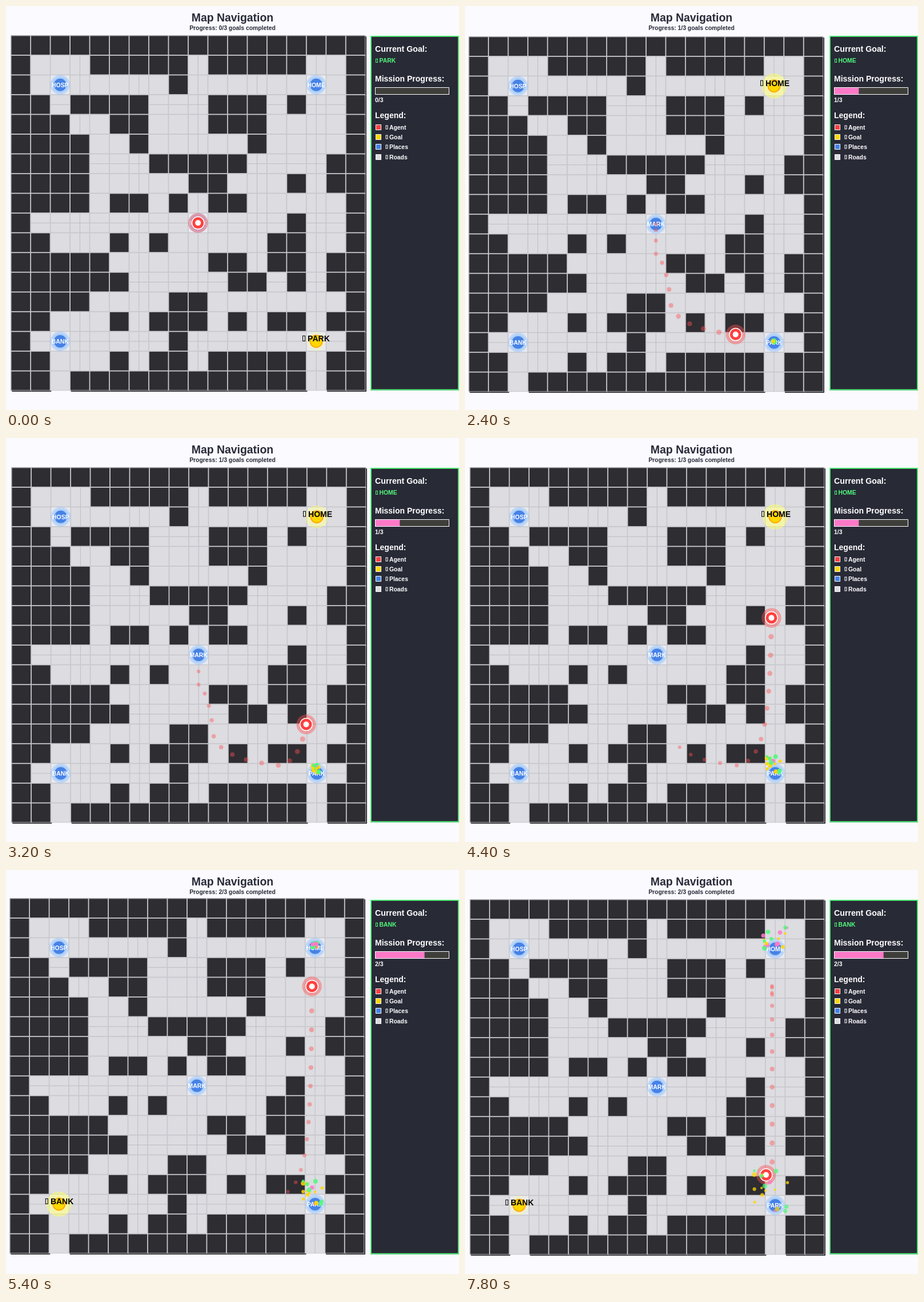
An HTML page with a canvas that plays this animation: 793 by 706 pixels, repeating every 8 s.

```html
<!DOCTYPE html>
<html lang="en">
<head>
<meta charset="utf-8">
<title>Map Navigation</title>
<style>
html, body { margin: 0; width: 100%; height: 100%; overflow: hidden; background: #fafaff; }
canvas { display: block; }
</style>
</head>
<body>
<canvas id="stage" width="793" height="706"></canvas>
<script>
const ctx = document.getElementById('stage').getContext('2d');
const STEP = 200, STEPS = 40, CELL = 34.48, LEFT = 8.6, TOP = 51.5, TRAIL = 15;
const INK = '#282a36', GREEN = '#50fa7b', PINK = '#ff79c6', GOLD = '#ffd700';
const RED = '#ff4040', BLUE = '#4682e6', WALL = '#2d2d32', ROAD = '#dcdce1', LINE = '#c8c8cd';

const MAP = `
##################
#...#####.#####..#
#.......#........#
##.####...###.#..#
###..##...###....#
####..#.....#....#
####...#####....##
####.....##...#.##
####.##.#.##.....#
#.............#..#
##...#.#.....##..#
#####.....##.##.##
######.....##.#.##
####....##.......#
##...#.###.#.##.##
#.......#........#
##...#.##.#####.##
##.############.##`.trim().split('\n');
const SIZE = MAP.length * CELL;

const PLACES = { HOSP: [2, 2], HOME: [15, 2], MARK: [9, 9], BANK: [2, 15], PARK: [15, 15] };
const GOALS = ['PARK', 'HOME', 'BANK'];

const HEADINGS = 'DDDRDDDRRRRR' + 'U'.repeat(13) + 'D'.repeat(13) + 'L';
const TURNS = { U: [0, -1], D: [0, 1], L: [-1, 0], R: [1, 0] };
const SPEED = 33.6, EASE = .32, REACH = 2.5 * CELL;

const center = name => {
  const [col, row] = PLACES[name];
  return [LEFT + (col + .5) * CELL, TOP + (row + .5) * CELL];
};

// The agent eases its velocity toward each heading in turn.
const route = [center('MARK')];
const reached = [];
let vx = 0, vy = 0;
[...HEADINGS].forEach((heading, i) => {
  const [dx, dy] = TURNS[heading], [x, y] = route[i];
  vx += (dx * SPEED - vx) * EASE;
  vy += (dy * SPEED - vy) * EASE;
  route.push([x + vx, y + vy]);
  const [gx, gy] = center(GOALS[reached.length]);
  if (Math.hypot(gx - x - vx, gy - y - vy) < REACH) reached.push(i + 1);
});

function randomFrom(seed) {
  return () => {
    seed = (seed * 16807) % 2147483647;
    return seed / 2147483647;
  };
}

const bursts = reached.map((start, i) => {
  const random = randomFrom(4211 + i * 977);
  const pieces = Array.from({ length: 18 }, () => ({
    vx: (random() * 2 - 1) * 1.4,
    vy: -.4 - random() * 2.6,
    r: 2 + random() * 2.3,
    color: [GREEN, GOLD, PINK][Math.floor(random() * 3)]
  }));
  return { start, origin: center(GOALS[i]), pieces };
});

function box(x, y, w, h, color) {
  ctx.fillStyle = color;
  ctx.fillRect(x, y, w, h);
}

function frame(x, y, w, h, color, width = 1) {
  ctx.strokeStyle = color;
  ctx.lineWidth = width;
  ctx.strokeRect(x + width / 2, y + width / 2, w - width, h - width);
}

function disc(x, y, r, color, alpha = 1) {
  ctx.globalAlpha = alpha;
  ctx.fillStyle = color;
  ctx.beginPath();
  ctx.arc(x, y, r, 0, Math.PI * 2);
  ctx.fill();
  ctx.globalAlpha = 1;
}

function text(str, x, y, size, color, align = 'left') {
  ctx.font = `bold ${size}px "Liberation Sans", Arial, sans-serif`;
  ctx.textAlign = align;
  ctx.fillStyle = color;
  ctx.fillText(str, x, y);
}

// A missing-glyph box followed by a label.
function boxedText(str, x, y, size, color) {
  const h = Math.round(size * .72);
  frame(x + 1, y - h, Math.round(size * .36), h, color);
  text(str, x + size * .72, y, size, color);
}

function eachCell(draw) {
  MAP.forEach((cells, row) => [...cells].forEach((cell, col) =>
    draw(cell === '#', LEFT + col * CELL, TOP + row * CELL, col, row)));
}

function drawMap() {
  eachCell((wall, x, y) => wall && box(x + 1.7, y + 1.7, CELL, CELL, '#1e1e22'));
  eachCell((wall, x, y, col, row) => {
    box(x, y, CELL, CELL, wall ? WALL : ROAD);
    if (wall) return;
    if (row % 3 === 0) box(x, y + CELL / 2 - .4, CELL, .9, '#b9b9be');
    if (col % 3 === 0) box(x + CELL / 2 - .4, y, .9, CELL, '#b9b9be');
  });
  const half = .9;
  for (let i = 0; i <= MAP.length; i++) {
    const from = Math.max(0, i * CELL - half), to = Math.min(SIZE, i * CELL + half);
    box(LEFT + from, TOP, to - from, SIZE, LINE);
    box(LEFT, TOP + from, SIZE, to - from, LINE);
  }
}

function drawPlace(name, isGoal, step) {
  const [x, y] = center(name);
  box(x - 16.4, y - 16.4, 32.8, 32.8, '#e8eaf0');
  if (isGoal) {
    const pulse = .5 - .5 * Math.cos(step * Math.PI * 2 / 4.875);
    disc(x, y, 17 + 5 * pulse, '#ffff64', .2 + .3 * pulse);
    disc(x, y, 11.5, '#ffa500');
    disc(x, y, 9.7, GOLD);
    return;
  }
  disc(x, y, 17.2, '#78b4ff', .35);
  disc(x, y, 14, '#78b4ff', .25);
  disc(x, y, 11, BLUE);
  text(name, x, y + 3.8, 10.4, '#fff', 'center');
}

function drawTrail(step) {
  const visible = route.slice(Math.max(0, step - TRAIL + 1), step + 1);
  visible.forEach(([x, y], i) => disc(x, y, 3 + 1.7 * (i + 1) / visible.length, '#ff5050', .43));
}

function drawAgent(step) {
  const [x, y] = route[step];
  disc(x, y, 17.2, '#ff5050', .43);
  disc(x, y, 11.5, '#fff');
  disc(x, y, 10, RED);
  disc(x, y, 5, '#fff');
}

function drawBurst({ start, origin: [x, y], pieces }, step) {
  const n = step - start + 1;
  if (n < 1) return;
  for (const p of pieces) {
    disc(x + p.vx * n, y + p.vy * n + .03 * n * n, p.r, p.color, 1 - n / 110);
  }
}

function shakeAt(step) {
  const n = step - reached.findLast(at => at <= step);
  if (!(n < 5)) return [0, 0];
  const amount = 3.2 * (1 - n * n / 25), angle = (133 + 51 * n) * Math.PI / 180;
  return [Math.round(amount * Math.cos(angle)), Math.round(amount * Math.sin(angle))];
}

function drawPanel(goal, done) {
  box(638, 52, 155, 619.5, INK);
  frame(638, 52, 155, 619.5, GREEN, 1.8);
  text('Current Goal:', 646, 80, 14.2, '#fff');
  boxedText(goal, 646, 99, 10.4, GREEN);
  text('Mission Progress:', 646, 132, 14, '#fff');
  box(646, 142, 130, 13, '#3e3f3a');
  box(646, 142, 130 * done / 3, 13, PINK);
  frame(646, 142, 130, 13, '#fff');
  text(`${done}/3`, 646, 168, 10.4, '#fff');
  text('Legend:', 646, 196, 14, '#fff');
  [['Agent', RED], ['Goal', GOLD], ['Places', BLUE], ['Roads', ROAD]].forEach(([label, color], i) => {
    const y = 207 + Math.round(i * 17.2);
    box(647, y, 10, 10, color);
    frame(647, y, 10, 10, '#fff');
    boxedText(label, 663.5, y + 8.5, 10.4, '#fff');
  });
}

function draw(step) {
  const done = reached.filter(at => step >= at).length, goal = GOALS[done];
  box(0, 0, 793, 706, '#fafaff');
  ctx.save();
  ctx.translate(...shakeAt(step));
  drawMap();
  Object.keys(PLACES).forEach(name => drawPlace(name, name === goal, step));
  const [x, y] = center(goal);
  boxedText(goal, x - 25, y, 14, '#000');
  drawTrail(step);
  drawAgent(step);
  bursts.forEach(burst => drawBurst(burst, step));
  ctx.restore();
  text('Map Navigation', 396.5, 27, 19.4, INK, 'center');
  text(`Progress: ${done}/3 goals completed`, 396.5, 41.5, 10.4, INK, 'center');
  drawPanel(goal, done);
}

const began = performance.now();
let shown = -1;
function tick() {
  const step = Math.floor((performance.now() - began) / STEP) % STEPS;
  if (step !== shown) draw(shown = step);
  requestAnimationFrame(tick);
}
tick();
</script>
</body>
</html>
```
